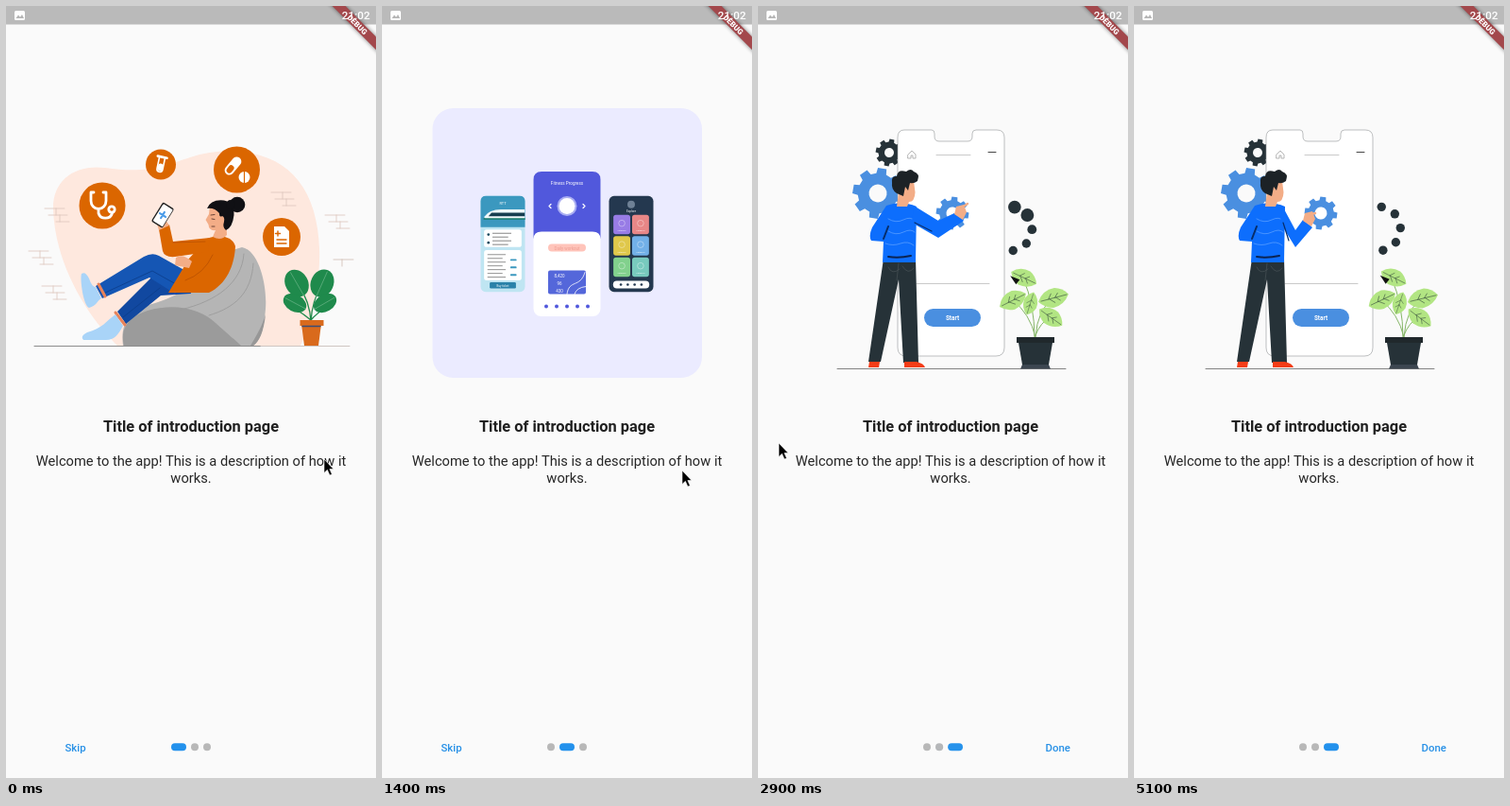
Write an HTML page that moves like this. It is 392 by 816 pixels and loops after 5.2 s.

```html
<!DOCTYPE html>
<html lang="en">
<head>
<meta charset="utf-8">
<title>Introduction screen</title>
<style>
html, body { margin: 0; width: 100%; height: 100%; overflow: hidden; background: #fafafa; }
svg { display: block; width: 392px; height: 816px; font-family: Roboto, sans-serif; }
.title { font-size: 16.4px; font-weight: 700; fill: #202020; }
.body { font-size: 14.7px; fill: #262626; }
.btn { font-size: 11.4px; font-weight: 500; fill: #2790e6; }
.mid { text-anchor: middle; }
.line { fill: none; stroke-linecap: round; stroke-linejoin: round; }
.shade { filter: blur(2px); }
</style>
</head>
<body>
<svg id="stage" viewBox="0 0 392 816"></svg>
<script>
const LOOP = 5200, STEP = 100, W = 392;
const ORANGE = '#db6600', SKIN = '#f3ad87', BLUE = '#4a8fe0', INK = '#263238';

const rect = (x, y, w, h, fill, r = 0) =>
  `<rect x="${x}" y="${y}" width="${w}" height="${h}" rx="${r}" fill="${fill}"/>`;
const disc = (x, y, r, fill) => `<circle cx="${x}" cy="${y}" r="${r}" fill="${fill}"/>`;
const shape = (d, fill) => `<path d="${d}" fill="${fill}"/>`;
const line = (d, color, w = 1) => `<path class="line" d="${d}" stroke="${color}" stroke-width="${w}"/>`;
const label = (x, y, size, text, fill = '#fff', weight = 400) =>
  `<text class="mid" x="${x}" y="${y}" font-size="${size}" font-weight="${weight}" fill="${fill}">${text}</text>`;
const group = (id, inner, x = 0, y = 0) => `<g id="${id}" transform="translate(${x} ${y})">${inner}</g>`;

function gear(r, teeth, hole) {
  const step = 2 * Math.PI / teeth, pts = [];
  for (let i = 0; i < teeth; i++)
    for (const [k, q] of [[-.32, .79], [-.22, 1], [.22, 1], [.32, .79]]) {
      const a = (i + k) * step;
      pts.push((Math.cos(a) * r * q).toFixed(2) + ' ' + (Math.sin(a) * r * q).toFixed(2));
    }
  return `M${pts.join('L')}ZM${hole} 0A${hole} ${hole} 0 1 0 ${-hole} 0A${hole} ${hole} 0 1 0 ${hole} 0Z`;
}
const cog = (id, x, y, r, teeth, hole, fill) =>
  group('', `<path id="${id}" fill-rule="evenodd" d="${gear(r, teeth, hole)}" fill="${fill}"/>`, x, y);

const copy = `<g class="mid">
  <text class="title" x="196" y="450">Title of introduction page</text>
  <text class="body" x="196" y="486.4">Welcome to the app! This is a description of how it</text>
  <text class="body" x="196" y="503.7">works.</text></g>`;

// Page 1: reader on a beanbag
const bricks = [[41, 214], [38, 296], [24, 259], [281, 197], [338, 221]].map(([x, y]) =>
  line(`M${x} ${y}h21m-9 0v7m-8 0h20m-8 0v7m-4 0h14`, '#dcc5bb', .8)).join('') +
  line('M347 268h21m-12 0v7', '#d0bbb2', .8);

const icons = {
  steth: line('M-9 -14h-3v9a8 8.500 0 0 0 16 0v-9h-3M-4 4v4a7.500 7 0 0 0 14.500 0v-2', '#fff', 2.8) +
    disc(10, 4, 4.6, '#fff') + disc(10, 4, 1.8, ORANGE),
  tube: `<g transform="rotate(12)">${line('M-5 -8H5', '#fff', 2.6)}${line('M-3 -7V5a3 3 0 0 0 6 0V-7', '#fff', 1.6)}${rect(-2.6, -1, 5.2, 8, '#fff', 2.5)}</g>`,
  pill: `<g transform="translate(-4 -4) rotate(40)">${rect(-5, -11, 10, 22, '#fff', 5)}${rect(-3, 0, 6, 9, ORANGE, 3)}</g>` +
    disc(8, 8, 6, '#fff') + line('M8 2v12', ORANGE, 1.2),
  doc: shape('M-8 -11H3L8 -6V11H-8Z', '#fff') + line('M-4 -6v5M-6.500 -3.500h5M-5 3H5M-5 7H5', ORANGE, 1.4),
};
const bubbles = [
  ['steth', 102, 211, t => 24.5 + 3.5 * Math.sin(2 * Math.PI * t / 2400), 24.5],
  ['tube', 164, 167.5, t => 15.2 + .8 * Math.cos(2 * Math.PI * t / 1200), 16],
  ['pill', 244.5, 173, t => 21.75 + 2.75 * Math.cos(2 * Math.PI * t / 1200), 24.5],
  ['doc', 292, 244, () => 20, 20],
];
const frond = (x, y, a, rx = 12, ry = 15) =>
  `<g transform="translate(${x} ${y}) rotate(${a})"><ellipse rx="${rx}" ry="${ry}" fill="#1f8a4c"/>${line(`M0 ${-ry + 2}V${ry}`, '#65b183', .7)}</g>`;

const reader =
  shape('M118 359C88 330 52 275 50 215C49 185 72 167 105 171C150 178 170 168 195 160C235 147 285 152 310 185C332 212 336 260 329 300C325 330 318 347 312 359Z', '#fee8de') +
  bricks + line('M30 359.500H270', '#8c8c8c', 1.1) + line('M270 359.500H364', '#cfc6c2', 1) +
  shape('M250 255C268 258 277 296 275 320C273 345 268 355 262 359H124C121 335 130 322 158 314C190 304 225 280 240 258Z', '#b5b5b5') +
  shape('M125 359C121 342 128 329 150 322C180 313 208 321 222 335C235 347 244 354 249 359Z', '#9b9b9b') +
  line('M252 262C250 292 224 312 185 321M262 272C260 304 242 319 215 327', '#999', .8) +
  shape('M259 359C267 346 272 336 275 326C273 345 268 355 262 359Z', '#979797') +
  // legs and socks
  shape('M118 323L127 336L164 306L196 304L190 280L160 281Z', '#1148a0') +
  shape('M95 296L102 309L152 287L179 304L203 287L162 264Q155 260 146 265Z', '#1556b4') +
  line('M105 303L155 280L180 294M124 329L163 298', '#0c3d8a', .8) +
  line('M98 294L105 307M116 324L126 337', '#e8835a', 3) +
  shape('M95 297L101 309C96 312 96 317 88 319C82 317 78 288 80 283Q84 280 88 288Q91 297 95 297Z', '#a9d4f8') +
  shape('M116 326L124 338C119 347 115 353 106 353H82Q78 349 86 345C102 341 106 333 116 326Z', '#a9d4f8') +
  // body and arm
  shape('M213 246C226 240 241 244 243 254C242 274 234 294 215 303H172C178 293 185 282 193 268Z', ORANGE) +
  shape('M216 245L177 249L173 231L162 236L166 259Q168 266 179 265L214 260Z', ORANGE) +
  line('M177 250L211 249M219 263Q210 283 190 290', '#b85000', .8) +
  shape('M180 266Q187 261 197 270L194 277L179 274Z', SKIN) +
  shape('M162 237L159 227Q164 222 169 226L173 232Z', SKIN) +
  shape('M216 211Q228 207 233 222L234 242Q228 249 219 244L222 237Q215 238 214.500 231L211.500 226L215 220Z', SKIN) +
  shape('M213 214Q217 204 231 205.500Q242 208 241.500 221Q240 234 233 237Q229 234 231 228Q232 223 229 222Q226 224 226 219Q221 213 213 214Z', '#101014') +
  disc(245, 210, 8.3, '#101014') + disc(238, 210, 5, '#101014') +
  line('M217 221l4 -.500M218 225l3 .500M218 233l3 0', '#4a2a22', .8) +
  `<g transform="translate(166 221) rotate(32)">${rect(-7, -12, 14, 24, '#222', 2)}${rect(-5.7, -10.5, 12, 21, '#fff', 1)}${group('cross', line('M0 -3.500v7M-3.500 0h7', '#4a9be8', 2.2))}</g>` +
  // potted plant
  line('M323 334Q322 312 310 296M323 334Q324 312 334 296M323 332Q316 326 306 320M323 332Q330 324 340 318', '#1f8a4c', 1.3) +
  frond(308, 293, -30) + frond(335, 293, 24) + frond(306, 314, -62, 9, 13) + frond(338, 314, 60, 9, 13) +
  shape('M313 336H334L331 359H316Z', '#d96a1c') + rect(311.5, 332, 25, 6, '#d96a1c') + line('M314 338.500H333', '#3b4d75', 1.3) +
  bubbles.map(([id, x, y, , r]) => group('', `<g id="${id}">${disc(0, 0, r, ORANGE)}${icons[id]}</g>`, x, y)).join('');

// Page 2: carousel of phone screens, each 71 by 153 around its centre
const shell = fill => rect(-35.5, -76.5, 71, 153, fill, 8);
const rules = (x, y, n, w, c) =>
  Array.from({ length: n }, (_, i) => line(`M${x} ${y + i * 6}h${w - i % 2 * 5}`, c, 1.2)).join('');
const nav = (y, c, n = 5) => Array.from({ length: n }, (_, i) => disc((i - (n - 1) / 2) * 11, y, 2, c)).join('');

const trainApp = shell('#bfe5f2') + shape('M-35.5 -68Q-35.5 -76.500 -27 -76.500H27Q35.5 -76.500 35.5 -68V-27H-35.5Z', '#3b98bf') +
  label(0, -63, 6, 'RTT') +
  shape('M-30 -43Q-22 -55 -3 -55H35V-40H-28Z', '#eef8fa') + shape('M-18 -50H35V-44H-23Z', '#163e50') + line('M-30 -40H35', '#147a68', 2.4) +
  rect(-30, -23, 60, 28, '#fff', 4) + rules(-16, -17, 4, 29, '#666') + disc(-23, -15, 2, '#17475c') + disc(-23, -2, 2, '#17475c') +
  rect(-30, 10, 60, 48, '#fff', 4) + rules(-24, 17, 7, 28, '#777') +
  [24, 36, 48].map(y => rect(12, y, 10, 3, '#3b98bf', 1)).join('') + rect(-21, 61, 42, 10, '#2a82a9', 2) + label(0, 68, 4.5, 'Buy ticket');

const fitApp = shell('#fff') + shape('M-35.5 -5V-68Q-35.5 -76.500 -27 -76.500H27Q35.5 -76.500 35.5 -68V-5Q35.5 -13 27 -13H-27Q-35.5 -13 -35.5 -5Z', '#5158dc') +
  label(0, -63, 4.6, 'Fitness Progress') + line('M-17 -42l-2 2l2 2M17 -42l2 2l-2 2', '#fff', 1.2) +
  group('fitStart', disc(0, -40, 10.5, '#a9adf2') + disc(0, -40, 8.5, '#fff') + rect(-20, 0, 40, 8, '#ffc4ba', 4) +
    label(0, 6, 4.5, 'Daily workout', '#ee9e93') + rect(-20, 28, 40, 25, '#5467da', 2) +
    line('M0 53C2 37 14 47 19 30M8 53Q10 46 20 45', '#fff', .8) +
    label(-8, 35, 4.5, '8,420') + label(-8, 43, 4.5, '96') + label(-8, 51, 4.5, '430') + nav(66, '#5158dc')) +
  group('fitEnd', disc(0, -40, 18, '#8f94ee') + disc(0, -40, 15, '#fff') + line('M0 -51a11 11 0 1 1 -11 11', '#ef6a70', 1.8) +
    label(0, -38, 5, '75%', '#ef6a70') + rect(-19, -5, 38, 8, '#f8665f', 4) + label(0, .5, 4, 'Daily workout') +
    [-21, 0, 21].map((x, i) => rect(x - 7.5, 9, 15, 15, i === 1 ? '#fb5a55' : '#dfe2f4', 4) + disc(x, 16, 2.6, i === 1 ? '#fff' : '#788096') + label(x, 30, 3, 'Active', '#555')).join('') +
    rect(-29, 35, 58, 19, '#5160d7', 4) + [-21, -13, -5, 3].map((x, i) => rect(x, 41, 5, 7, i === 3 ? '#ff8756' : '#fff')).join('') +
    label(0, 53, 3, 'Mon Tue Wed Thu Fri') + disc(0, 65, 4.5, '#f8665f') + disc(0, 65, 1.4, '#fff'));

const tiles = ['#987ce6', '#e88787', '#e0c84b', '#72b0e8', '#82d18d', '#78cabe'];
const darkApp = shell('#24384f') + disc(0, -63, 6, '#6f8196') + label(0, -51, 4.6, 'Explore') +
  tiles.map((c, i) => {
    const x = i % 2 ? 15 : -15, y = -31 + (i >> 1) * 34;
    return rect(x - 13.5, y - 15.5, 27, 31, c, 4) + `<circle cx="${x}" cy="${y - 2}" r="5" fill="none" stroke="#fff" stroke-opacity=".55"/>` + label(x, y + 11, 3.5, 'Category');
  }).join('') + rect(-29, 59, 58, 12, '#fff', 6) + nav(65, '#24384f', 4);

const blackApp = shell('#202124') + label(-14, -59, 6, 'Home') + rect(-28, -51, 56, 24, '#171a5c', 3) + rules(-22, -46, 3, 42, '#6264d9') +
  rect(-28, -20, 56, 35, '#11134a', 3) + line('M-22 7l10 -13 8 7 9 -12 15 9', '#5358ff', 2) +
  rect(-28, 22, 26, 13, '#315cce', 3) + rect(2, 22, 26, 13, '#315cce', 3) + rules(-28, 44, 2, 52, '#55575c') + nav(66, '#777');

const carousel = rect(53.5, 108, 285.5, 285, '#ebebff', 22) +
  [trainApp, fitApp, darkApp, blackApp].map((app, i) => `<g id="app${i}">${app}</g>`).join('');

// Page 3: man, gears and a large phone
const leaf = (x, y, a, s = 1) =>
  `<g transform="translate(${x} ${y}) rotate(${a}) scale(${s})">${shape('M-16 0Q-9 -11 4 -10Q12 -8 17 0Q10 10 -2 10Q-11 8 -16 0Z', '#b2e583')}${line('M-13 0H15M-5 0l4 -5M2 0l4 -4M-4 0l5 5M3 0l4 4', '#3c5440', .6)}</g>`;

const builder =
  cog('cogDark', 131, 155, 14.5, 8, 5, INK) + cog('cogBig', 119, 198, 27, 8, 9.5, BLUE) + group('ring', '') +
  `<path d="M147 131H176Q179 131 179 135V138Q179 143 184 143H214Q219 143 219 138V135Q219 131 223 131H245Q253 131 253 139V361Q253 370 244 370H149Q140 370 140 361V139Q140 131 147 131Z" fill="#fff" stroke="#929698" stroke-width=".6"/>` +
  line('M181 157.500H217M160 293.500H237', '#c4c4c4', .9) + line('M236 154.500H244', '#333', .9) +
  line('M151 157l4 -4 4 4v4h-3v-3h-2v3h-3Z', '#999', .7) +
  rect(168, 320, 60, 19, BLUE, 9.5) + label(198, 331.5, 6.4, 'Start', '#fff', 700) +
  cog('cogSmall', 198, 219, 17.5, 8, 6.5, BLUE) + line('M76 383.500H318', '#777', .9) +
  // legs and shoes
  shape('M125 267H159L162 377H146L141 289L122 376H109Z', INK) +
  line('M130 276q4 9 12 2M145 275q6 10 12 2M139 290l2 -18', '#485257', .7) +
  shape('M110 376H121L120 382H109Z', '#f43d17') + shape('M147 376H160Q168 378 169 382H147Z', '#f43d17') +
  // torso, resting arm, head
  shape('M128 211Q144 205 160 212L159 271H124L125 249L112 248Q109 243 113 234Z', '#0d6efd') +
  line('M130 225q8 5 16 1t12 1M130 238q8 5 16 1t12 0M127 251q8 3 16 0t14 2', '#62a4ff', .7) +
  line('M125 246L130 233', '#072d69', 2) + line('M130 265Q141 267 154 264', '#0b2453', 2) +
  shape('M142 190L157 185L158.500 197Q158 207 152 207L150 212H139Z', SKIN) +
  shape('M134 187Q133 179 139 180Q140 172 149 175Q154 171 157 175Q164 177 161 185Q157 188 153 187L151 195L148 191L146 201L139 198Q133 194 134 187Z', '#1c2226') +
  group('arm', '') +
  // plant
  line('M285 351Q285 315 273 288M286 350Q280 325 262 311M286 350Q288 320 305 309M286 348Q291 335 301 329', '#86b668', 1) +
  group('leaves', leaf(274, 287, 26, .9) + leaf(262, 311, -26, .95) + leaf(305, 309, -14) + leaf(302, 329, 36, .9) + leaf(281, 314, 108, .75) + shape('M260 285L270 289L266 294Z', '#111')) +
  rect(266, 350, 40, 6, '#20282c') + shape('M268 356H304L300 379H272Z', INK) + shape('M272 379H300L302 383.500H270Z', '#3c4650');

// Fixed chrome
const ribbon = `<g transform="translate(392 0) rotate(45)">
  <g class="shade">${rect(-40, 22.9, 80, 9.8, 'rgba(0,0,0,.5)')}</g>${rect(-40, 22.9, 80, 9.8, '#a3484c')}
  ${label(0, 30.8, 8.1, 'DEBUG', '#fff', 900)}</g>`;
const chrome = rect(0, 0, W, 19.5, '#bababa') + rect(9, 5, 11, 10, '#fff', 1.5) + shape('M10.500 13L13 9.500L15 11.700L17 9L19 13Z', '#b5b5b5') +
  ribbon + label(370.7, 14.3, 11.7, '21:02', '#fff', 500) +
  '<text id="skip" class="btn mid" x="73.5" y="788">Skip</text><text id="done" class="btn mid" x="317.7" y="788">Done</text>' +
  [0, 1, 2].map(i => `<rect id="dot${i}" y="779.3" height="8" rx="4"/>`).join('');
const pointer = '<path id="pointer" d="M0 0V14.500L3.400 11.300L6 17L8.400 16L5.900 10.500H10Z" fill="#000" stroke="#fff" stroke-width=".6"/>';

const stage = document.getElementById('stage');
stage.innerHTML = [reader, carousel, builder].map((art, i) => group('page' + i, art + copy)).join('') + chrome + pointer;
const el = {};
stage.querySelectorAll('[id]').forEach(n => { if (n.id) el[n.id] = n; });

const clamp = v => Math.max(0, Math.min(1, v));
const smooth = v => { v = clamp(v); return v * v * (3 - 2 * v); };
const mix = (a, b, k) => a + (b - a) * k;
function along(keys, t) {
  let i = 1;
  while (i < keys.length - 1 && keys[i][0] < t) i++;
  const a = keys[i - 1], b = keys[i], k = clamp((t - a[0]) / (b[0] - a[0]));
  return a.slice(1).map((v, j) => mix(v, b[j + 1], k));
}
const set = (id, name, value) => el[id].setAttribute(name, value);

const scroll = [[400, 0], [600, 65], [700, 165], [800, 275], [900, 345], [1000, 378], [1100, 389], [1200, 392],
  [2300, 392], [2400, 422], [2500, 515], [2600, 625], [2700, 710], [2800, 758], [2900, 776], [3000, 782], [3100, 784]];
const mouse = [[0, 337, 479], [300, 334, 478], [600, 219, 474], [800, 84, 472], [950, 84, 474], [1400, 318, 491], [1700, 335, 487],
  [2100, 336, 485], [2300, 320, 482], [2700, 40, 464], [2900, 22, 462], [3100, 30, 475], [3500, 318, 773], [3700, 322, 770], [3900, 388, 34]];
const spin = [[2000, -50, -320], [2900, 2, -57], [4000, 70, 265], [5100, 118, 540]];
const reach = [[2900, 183, 238, 206, 220], [4000, 178, 247, 189, 221], [5100, 171, 248, 185, 227]];
const slotX = [96, 128, 196, 264, 296], slotW = [0, 47, 71, 47, 0];

function drawDots(pos) {
  let x = 175;
  for (let i = 0; i < 3; i++) {
    const k = clamp(1 - Math.abs(i - pos)), w = 8 + 8 * k;
    set('dot' + i, 'x', x);
    set('dot' + i, 'width', w);
    set('dot' + i, 'fill', `rgb(${mix(184, 35, k)},${mix(184, 145, k)},${mix(184, 236, k)})`);
    x += w + 5;
  }
}

function drawCarousel(t) {
  const shift = smooth((t - 1800) / 560);
  for (let i = 0; i < 4; i++) {
    const s = clamp((i + 1 - shift) / 4) * 4, n = Math.min(3, Math.floor(s));
    const x = mix(slotX[n], slotX[n + 1], s - n), w = mix(slotW[n], slotW[n + 1], s - n);
    set('app' + i, 'transform', `translate(${x} 251.5) scale(${w / 71})`);
  }
  const change = clamp((t - 1550) / 250);
  set('fitStart', 'opacity', 1 - change);
  set('fitEnd', 'opacity', change);
}

function drawBuilder(t) {
  const [turn, peak] = along(spin, t);
  let ring = '';
  for (let i = 0; i < 9; i++) {
    const a = turn + i * 40, rad = a * Math.PI / 180;
    const near = Math.max(0, Math.cos((a - peak) * Math.PI / 180));
    ring += disc(259 + 23.3 * Math.cos(rad), 235.4 + 23.3 * Math.sin(rad), 4.7 + 2.8 * near ** 4, INK);
  }
  el.ring.innerHTML = ring;
  const a = (t - 2900) * 45 / 1100;
  set('cogBig', 'transform', `rotate(${a + 10})`);
  set('cogDark', 'transform', `rotate(${12 - a})`);
  set('cogSmall', 'transform', `rotate(${a + 8})`);
  const [ex, ey, hx, hy] = along(reach, t), point = clamp((5100 - t) / 1100);
  el.arm.innerHTML = shape(`M157 211L${ex} ${ey - 11}L${hx - 6} ${hy - 1}L${hx + 4} ${hy + 7}L${ex} ${ey + 7}L155 229Z`, '#0d6efd') +
    line(`M158 229L${ex - 7} ${ey}`, '#072d69', 1.2) +
    shape(`M${hx - 6} ${hy}L${hx - 4} ${hy - 8}L${hx + 4} ${hy - 10}L${hx + 7} ${hy - 2}L${hx + 3} ${hy + 6}Z`, SKIN) +
    line(`M${hx + 2} ${hy - 7}l${mix(5, 6, point)} ${mix(-1, -4, point)}`, SKIN, 2.4);
  set('leaves', 'transform', `rotate(${.8 * Math.sin(t / 700)} 286 350)`);
}

function render(t) {
  const [off] = along(scroll, t), pos = off / W;
  for (let i = 0; i < 3; i++) set('page' + i, 'transform', `translate(${i * W - off} 0)`);
  for (const [id, , , radius, base] of bubbles) set(id, 'transform', `scale(${radius(t) / base})`);
  set('cross', 'opacity', clamp((500 - t) / 200));
  drawCarousel(t);
  drawBuilder(t);
  drawDots(pos);
  const last = clamp((pos - 1.5) * 4);
  set('skip', 'opacity', 1 - last);
  set('done', 'opacity', last);
  set('pointer', 'transform', `translate(${along(mouse, t).join(' ')})`);
  set('pointer', 'visibility', t < 4000 ? 'visible' : 'hidden');
}

const start = performance.now();
function tick() {
  const t = (performance.now() - start) % LOOP;
  render(Math.floor(t / STEP) * STEP);
  requestAnimationFrame(tick);
}
tick();
</script>
</body>
</html>
```
